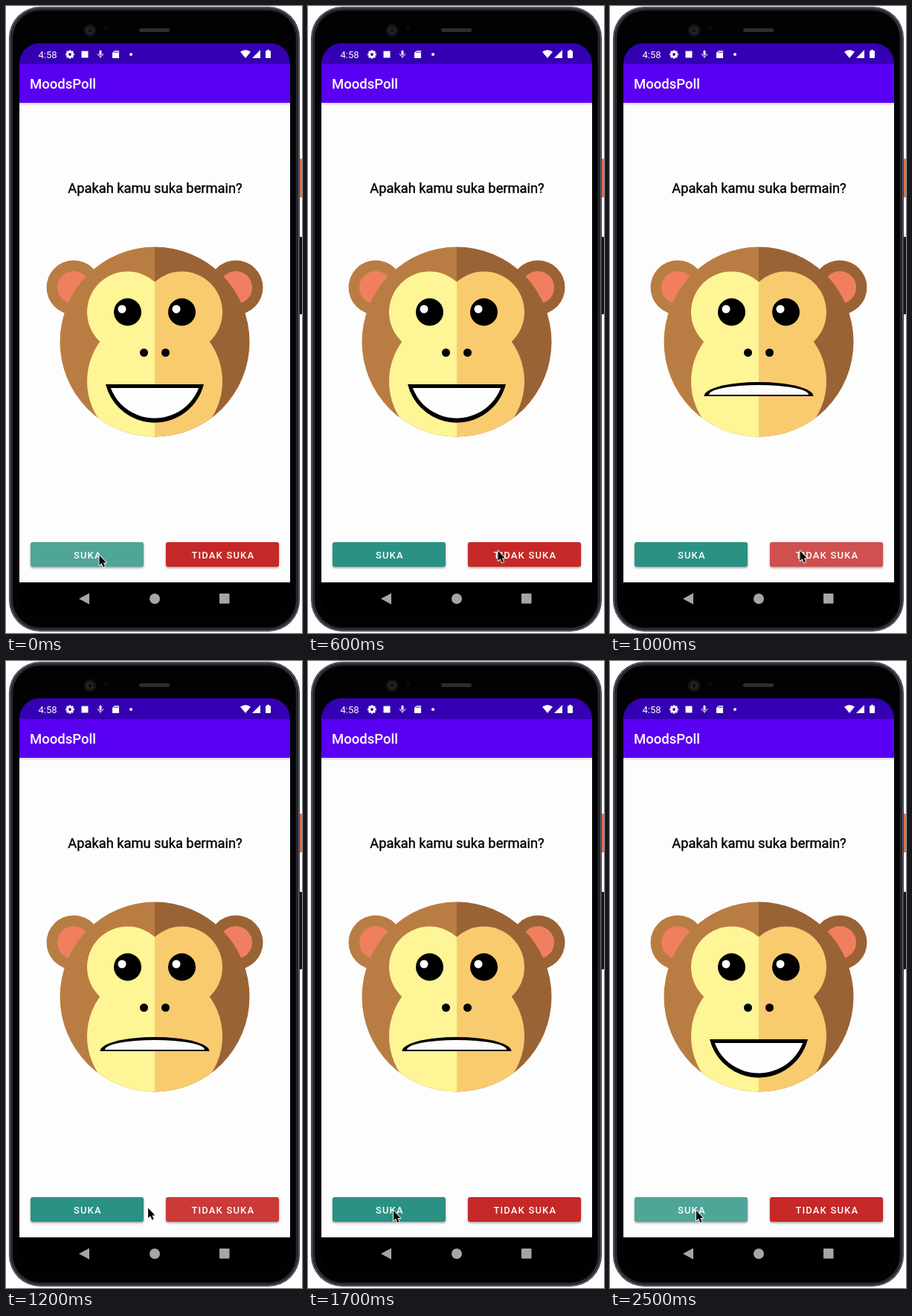
An HTML page with a canvas that plays this animation: 398 by 842 pixels, repeating every 2550 ms.

```html
<!DOCTYPE html>
<html lang="id">
<head>
<meta charset="utf-8">
<title>MoodsPoll</title>
<style>
  html, body { margin: 0; width: 100%; height: 100%; overflow: hidden; background: #fdfdfd; }
  canvas { display: block; width: 398px; height: 842px; }
</style>
</head>
<body>
<canvas id="stage" width="398" height="842"></canvas>
<script>
const ctx = document.getElementById('stage').getContext('2d');
const LOOP = 2550, STEP = 50;
const PAPER = '#fdfdfd', WHITE = '#fefefe', BLACK = '#000';
const STATUS = '#3500b3', BAR = '#5a00f2', GREEN = '#2a9183', RED = '#c62828';
const FUR_LEFT = '#b97d43', FUR_RIGHT = '#9a6336', EAR = '#f07f5f';
const SKIN_LEFT = '#fdf596', SKIN_RIGHT = '#f9cb6f';

const clamp = v => Math.min(1, Math.max(0, v));
const ramp = (t, from, to) => clamp((t - from) / (to - from));
const ease = p => p * p * (3 - 2 * p);
const mix = (a, b, p) => a + (b - a) * p;

function shape(color, build) {
  ctx.fillStyle = color;
  ctx.beginPath();
  build(ctx);
  ctx.fill();
}
const disc = (x, y, r, color) => shape(color, c => c.arc(x, y, r, 0, 7));
const box = (x, y, w, h, r, color) => shape(color, c => c.roundRect(x, y, w, h, r));
function poly(color, ...pts) {
  shape(color, c => {
    for (let i = 0; i < pts.length; i += 2) c.lineTo(pts[i], pts[i + 1]);
    c.closePath();
  });
}
function clipped(build, draw) {
  ctx.save();
  ctx.beginPath();
  build(ctx);
  ctx.clip();
  draw();
  ctx.restore();
}
function label(text, x, y, size, color, { weight = 400, align = 'left', spacing = 0 } = {}) {
  ctx.font = `${weight} ${size}px Roboto, sans-serif`;
  ctx.textAlign = align;
  ctx.letterSpacing = spacing + 'px';
  ctx.fillStyle = color;
  ctx.fillText(text, x, y);
}

function drawPhone() {
  box(392, 205, 6, 52, 1, '#e56f4a');
  box(392, 310, 6, 104, 1, '#15151a');
  const rims = ['#32323a', '#6a6a78', '#1b1b21', '#3e3e4a', '#0d0d11', '#020203'];
  const insets = [0, 1, 2, 3.5, 4.5, 6];
  rims.forEach((color, i) => {
    const d = insets[i];
    box(4 + d, 1 + d, 391 - 2 * d, 839 - 2 * d, 42 - d, color);
  });
  disc(113, 33, 8.5, '#131318');
  disc(113, 33, 5, '#26262f');
  disc(113, 33, 2.5, '#0e0e12');
  disc(135, 30, 3, '#0a0a0d');
  box(179, 30, 41, 5, 2, '#2c2c33');
}

function drawStatusIcons() {
  label('4:58', 43.5, 69.8, 13, WHITE);
  for (let i = 0; i < 8; i++) {
    ctx.save();
    ctx.translate(86, 65);
    ctx.rotate(i * Math.PI / 4);
    box(-1.4, -5.8, 2.8, 4, 0.5, WHITE);
    ctx.restore();
  }
  disc(86, 65, 4.4, WHITE);
  disc(86, 65, 1.9, STATUS);

  box(101.5, 60.5, 9, 9, 0, WHITE);

  box(125.5, 59.5, 3, 6.5, 1.5, WHITE);
  ctx.strokeStyle = WHITE;
  ctx.lineWidth = 1;
  ctx.beginPath();
  ctx.arc(127, 64, 3.5, 0, Math.PI);
  ctx.moveTo(127, 67.5);
  ctx.lineTo(127, 70);
  ctx.stroke();

  poly(WHITE, 146, 60, 152, 60, 152, 70, 143, 70, 143, 63);
  for (const x of [146, 148, 150]) box(x, 61, 1, 2, 0, STATUS);
  disc(168, 65, 2, WHITE);

  shape(WHITE, c => {
    c.moveTo(322, 70);
    c.lineTo(315, 61.5);
    c.quadraticCurveTo(322, 56.5, 329, 61.5);
  });
  poly(WHITE, 342, 59, 342, 70, 331, 70);
  box(349, 60, 7, 10, 1, WHITE);
  box(351, 58.8, 3, 2, 0, WHITE);
}

function drawScreen() {
  box(18, 50, 364, 28, [27, 27, 0, 0], STATUS);
  box(18, 130, 364, 644, 0, PAPER);
  const shade = ctx.createLinearGradient(0, 130, 0, 134);
  shade.addColorStop(0, '#d2d2d2');
  shade.addColorStop(1, PAPER);
  box(18, 130, 364, 4, 0, shade);
  box(18, 78, 364, 52, 0, BAR);
  box(18, 774, 364, 45, [0, 0, 26, 26], BLACK);

  drawStatusIcons();
  label('MoodsPoll', 32, 111, 18.5, WHITE, { weight: 500 });
  label('Apakah kamu suka bermain?', 200.5, 250.5, 18.3, BLACK, { align: 'center' });
  ctx.strokeStyle = BLACK;
  ctx.lineWidth = 0.4;
  ctx.strokeText('Apakah kamu suka bermain?', 200.5, 250.5);

  const nav = '#a6a6a6';
  poly(nav, 98, 796, 112, 788.5, 112, 803.5);
  disc(200, 796, 7, nav);
  box(287, 789, 13.5, 13.5, 1, nav);
}

// Fills a shape with one colour left of the face's centre line and another right of it.
function halves(left, right, build) {
  clipped(c => c.rect(0, 300, 200, 300), () => shape(left, build));
  clipped(c => c.rect(200, 300, 198, 300), () => shape(right, build));
}
function circles(...list) {
  return c => list.forEach(([x, y, r]) => {
    c.moveTo(x + r, y);
    c.arc(x, y, r, 0, 2 * Math.PI);
  });
}
const head = circles([200, 451, 127.5]);

// Part of a disc below the given height.
function bowl(y, r, top, color) {
  const a = Math.asin((top - y) / r);
  shape(color, c => c.arc(200, y, r, a, Math.PI - a));
}
const dome = (y, rx, ry, color) =>
  shape(color, c => c.ellipse(200, y, rx, ry, 0, Math.PI, 2 * Math.PI));

function drawMonkey(happy) {
  halves(FUR_LEFT, FUR_RIGHT, circles([91, 378, 36.5], [309, 378, 36.5]));
  disc(91, 378, 22, EAR);
  disc(309, 378, 22, EAR);
  halves(FUR_LEFT, FUR_RIGHT, head);
  clipped(head, () => halves(SKIN_LEFT, SKIN_RIGHT,
    circles([163.5, 411, 54.5], [236.5, 411, 54.5], [200, 504, 91])));

  for (const x of [163.5, 236.5]) {
    disc(x, 411, 18.5, BLACK);
    disc(x - 7.5, 407, 5.5, WHITE);
  }
  disc(185.5, 465.5, 5.5, BLACK);
  disc(214.5, 465.5, 5.5, BLACK);

  if (happy) {
    bowl(491.5, 68, 508, BLACK);
    bowl(490, 63.5, 513, WHITE);
  } else {
    dome(524, 73.5, 19, BLACK);
    dome(522, 67, 13, WHITE);
  }
}

function drawButton(x, text, color, { lift, spread, glow, touchX }) {
  ctx.save();
  ctx.shadowColor = `rgba(0,0,0,${mix(0.4, 0.35, lift)})`;
  ctx.shadowBlur = mix(3, 8, lift);
  ctx.shadowOffsetY = mix(1.5, 4, lift);
  box(x, 720, 152, 33, 3, color);
  ctx.restore();
  if (glow > 0) {
    clipped(c => c.roundRect(x, 720, 152, 33, 3), () =>
      disc(touchX, 738, mix(8, 150, spread), `rgba(255,255,255,${0.18 * glow})`));
  }
  label(text, x + 76.8, 741.7, 13, WHITE, { weight: 500, align: 'center', spacing: 1.16 });
}

function drawButtons(t) {
  const press = (down, up) => ramp(t, down, down + 100) * (1 - ramp(t, up, up + 100));
  const green = t < 1000
    ? { lift: 0, spread: 1, glow: 1 - ramp(t, 0, 350), touchX: 126 }
    : { lift: press(2000, 2200), spread: ease(ramp(t, 2150, 2400)), glow: ramp(t, 2100, 2250), touchX: 116 };
  const red = {
    lift: press(650, 850),
    spread: ease(ramp(t, 750, 1000)),
    glow: ramp(t, 750, 900) * (1 - ramp(t, 1000, 1350)),
    touchX: 256
  };
  drawButton(33, 'SUKA', GREEN, green);
  drawButton(215, 'TIDAK SUKA', RED, red);
}

function cursorAt(t) {
  const there = ease(ramp(t, 40, 400));
  const back = ease(ramp(t, 1030, 1390));
  const drift = ramp(t, 2150, 2350);
  return [
    mix(mix(125.5, 255.5, there), 115, back) + drift,
    mix(mix(737.5, 731.5, there), 738, back)
  ];
}
function drawCursor(t) {
  ctx.save();
  ctx.translate(...cursorAt(t));
  ctx.lineJoin = 'round';
  ctx.strokeStyle = '#fff';
  ctx.lineWidth = 1.8;
  ctx.beginPath();
  [[0, 0], [0, 13.5], [3, 10.8], [5.3, 16], [7.6, 15], [5.4, 10], [9.3, 10]]
    .forEach(p => ctx.lineTo(...p));
  ctx.closePath();
  ctx.stroke();
  ctx.fillStyle = BLACK;
  ctx.fill();
  ctx.restore();
}

function render(now) {
  const t = Math.floor(now % LOOP / STEP) * STEP;
  box(0, 0, 398, 842, 0, PAPER);
  drawPhone();
  drawScreen();
  drawMonkey(t < 850 || t >= 2250);
  drawButtons(t);
  drawCursor(t);
}

let start;
function tick(now) {
  start ??= now;
  render(now - start);
  requestAnimationFrame(tick);
}
render(0);
requestAnimationFrame(tick);
</script>
</body>
</html>
```
